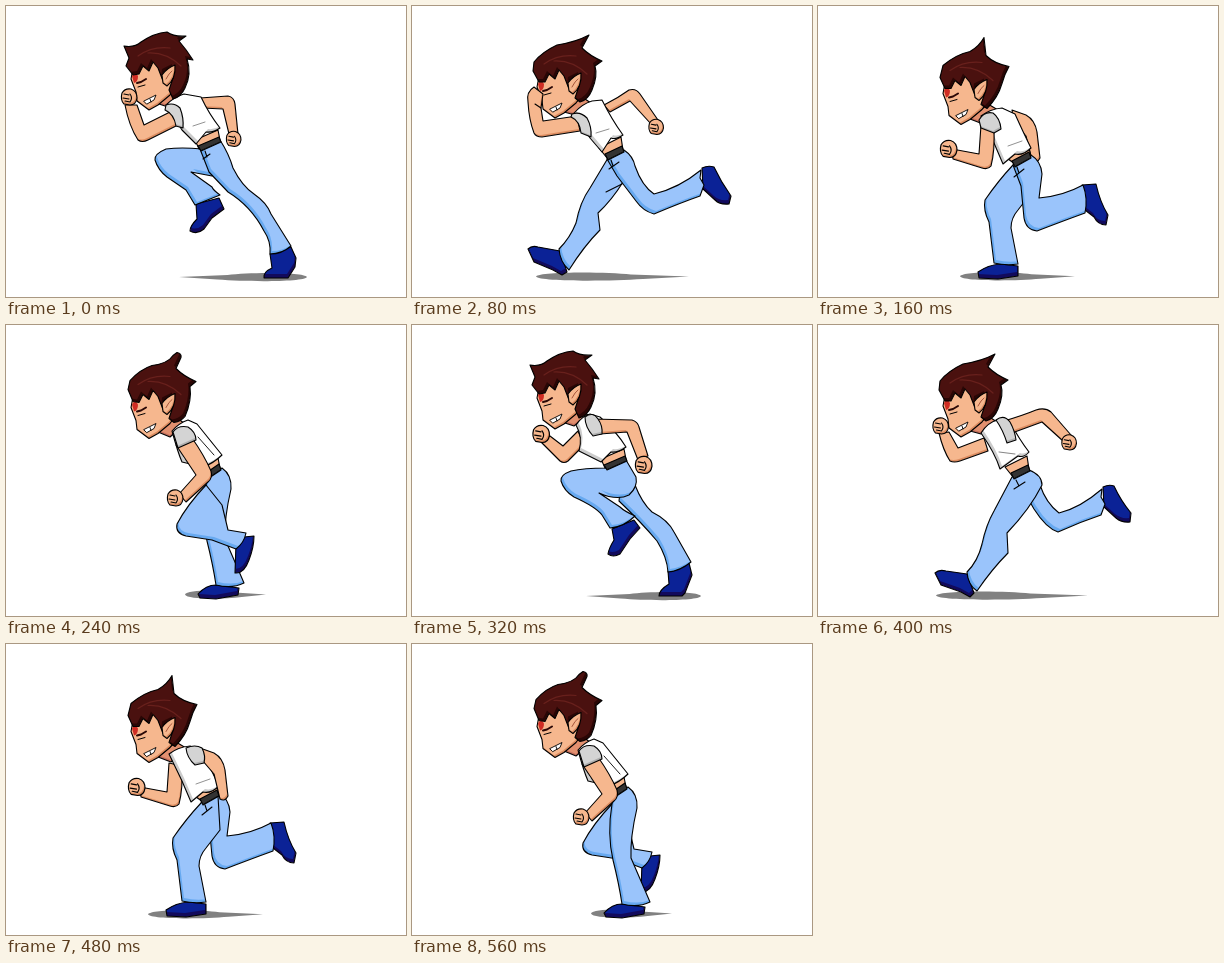
Write an HTML page with a canvas that moves like this. It is 400x291 px and loops after 0.64 s.

```html
<!DOCTYPE html>
<html lang="en">
<head>
<meta charset="utf-8">
<title>Run cycle</title>
<style>
  html, body { margin: 0; width: 100%; height: 100%; overflow: hidden; background: #fff; }
  canvas { display: block; width: 100vw; height: 100vh; }
</style>
</head>
<body>
<canvas id="stage"></canvas>
<script>
const W = 400, H = 291, STEP = 80;
const canvas = document.getElementById('stage');
const ctx = canvas.getContext('2d');
const ratio = window.devicePixelRatio || 1;
canvas.width = W * ratio;
canvas.height = H * ratio;

// Fills a path with its shade tone, then lays the lit tone over it, slightly shifted.
function solid(d, lit, shade, dx, dy) {
  const path = new Path2D(d);
  ctx.save();
  ctx.clip(path);
  ctx.fillStyle = shade;
  ctx.fill(path);
  ctx.translate(dx, dy);
  ctx.fillStyle = lit;
  ctx.fill(path);
  ctx.restore();
  line(path);
}

function line(d, color = '#000', width = 1.1) {
  ctx.strokeStyle = color;
  ctx.lineWidth = width;
  ctx.stroke(d instanceof Path2D ? d : new Path2D(d));
}

function flat(d, color) {
  ctx.fillStyle = color;
  ctx.fill(new Path2D(d));
}

const skin = d => solid(d, '#f6b78e', '#dc8c60', -1, -2);
const denim = d => solid(d, '#9ac4fb', '#67a9f0', 2, -3);
const cloth = d => solid(d, '#ffffff', '#cccccc', 2, -3);
const sleeve = d => solid(d, '#d4d4d4', '#aeaeae', -1, -2);
const shoe = d => solid(d, '#0b2296', '#120a5c', -1, -4);
const belt = d => solid(d, '#333333', '#111111', 0, -1);
const neck = d => solid(d, '#e2906f', '#c56f5c', 0, -2);

// A ground shadow, thick at one end and thin at the tip.
function shadow(fat, tip, y) {
  const at = t => fat + (tip - fat) * t;
  flat(`M${fat} ${y} C${at(0.02)} ${y - 5} ${at(0.45)} ${y - 5} ${at(0.62)} ${y - 2} L${tip} ${y}
    L${at(0.7)} ${y + 2.5} C${at(0.45)} ${y + 5} ${at(0.02)} ${y + 5} ${fat} ${y}Z`, '#818181');
}

function fist(x, y, r) {
  ctx.save();
  ctx.translate(x, y);
  ctx.scale(r / 8, r / 8);
  skin('M-7 -4 Q-4 -9 2 -8 Q8 -6 8 1 Q7 8 1 8 L-5 7 Q-9 3 -7 -4Z');
  line('M-5 -3 L0 -2 M-6 1 L0 2 M-4 4 L1 5 M1 -3 Q4 1 1 5');
  ctx.restore();
}

const hairTail = ' L163 84 L167 72 L168 61 L158 66 L157 75 L152 62 L147 56 L143 65 L137 60 L133 68 Z';
const hair = {
  sweep: 'M127 69 L120 60 L123 52 L118 40 Q128 42 135 36 Q148 27 161 26 Q168 31 180 30 L173 35 Q180 43 187 54 L181 53 Q186 68 179 82 Q175 91 167 93',
  spike: 'M127 68 L121 57 L122 48 Q130 38 145 31 Q164 28 177 21 L170 34 Q178 42 190 47 L183 52 Q186 62 180 76 Q176 86 168 88',
  lift: 'M127 68 L122 57 L125 45 Q138 34 152 31 Q161 26 166 17 L168 35 Q176 43 191 46 Q186 55 184 63 Q180 77 169 88',
  fall: 'M127 67 L122 55 L124 46 Q134 35 146 31 Q162 29 167 21 L171 18 Q176 19 175 23 L170 34 Q178 42 190 47 L184 52 Q186 66 179 82 Q175 87 168 88'
};

function head(dy, style) {
  ctx.save();
  ctx.translate(0, dy);
  skin('M127 62 L125 73 L130 86 L131 95 L143 104 L152 99 L164 89 L169 82 L170 68 L160 53 L140 55Z');
  flat('M126 70 Q129 64 132 70 Q132 76 128 77Z', '#cf2d24');
  line('M131 77 L135 76 L140 73', '#2a0806', 2);
  line('M132 81 L139 79', '#000', 1);
  flat('M138 95 L150 89 L148 94 L141 98Z', '#fff');
  line('M138 95 L150 89 L148 94 L141 98Z M144 93 L145 96', '#000', 0.9);
  solid(hair[style] + hairTail, '#4a110f', '#2a0605', -2, -3);
  line('M132 50 Q146 40 164 42 M142 47 Q160 46 175 60', '#68201c', 1.2);
  skin('M156 69 Q161 62 169 59 Q170 73 161 80 L157 77Z');
  line('M160 73 Q163 67 166 65', '#a6543a', 1);
  ctx.restore();
}

function waistHigh() {
  skin('M189 134 L212 124 L214 134 L193 143Z');
  belt('M192 140 L213 131 L215 136 L195 145Z');
  neck('M150 97 L168 84 L176 90 L162 101Z');
}

function waistLow() {
  skin('M187 142 L209 131 L211 144 L195 152Z');
  belt('M193 148 L210 140 L212 146 L196 154Z');
  neck('M152 106 L170 91 L179 97 L163 109Z');
}

// Push off, near arm forward.
function pushNear() {
  shadow(301, 173, 271);
  skin('M194 92 L222 90 Q228 91 229 98 L232 128 L223 128 L217 103 L196 102Z');
  fist(227.5, 133, 7.5);
  shoe('M190 198 L213 192 L218 203 L206 212 L198 223 Q191 229 184 225 Q184 220 191 213Z');
  denim('M196 143 Q175 141 160 143 Q148 148 149 154 Q152 164 161 171 L180 184 L189 199 L214 189 Q207 184 206 181 L185 166 L206 170 L216 160Z');
  shoe('M264 248 L285 241 L290 252 L289 261 L282 272 L258 272 Q257 266 266 262Z');
  denim('M194 143 L214 134 Q223 148 227 162 Q236 180 248 188 Q261 197 265 208 L285 240 Q276 248 264 248 Q265 235 258 225 Q245 200 222 186 L203 166Z');
  line('M199 145 L201 151 M197 153 L204 148');
  waistHigh();
  cloth('M160 99 Q168 91 178 88 L195 91 Q203 108 214 122 Q207 127 200 126 L190 138 L176 124Z');
  line('M187 120 L199 116', '#777', 0.8);
  head(0, 'sweep');
  skin('M166 105 L138 119 L131 99 L119 99 Q123 120 132 134 Q136 137 142 134 L172 119Z');
  fist(123, 91, 8);
  sleeve('M160 99 Q168 96 174 102 Q178 112 177 122 L170 120 Q168 108 159 104Z');
}

// Push off, far arm forward.
function pushFar() {
  shadow(289, 174, 271);
  skin('M166 106 L151 121 L138 111 L129 117 L148 136 Q152 139 156 136 L172 120Z');
  shoe('M256 246 L277 238 L280 250 L273 268 L270 271 L247 271 Q247 265 257 259Z');
  denim('M209 158 L223 160 Q230 178 240 187 Q256 195 262 207 L279 237 Q268 246 256 247 Q255 232 245 216 Q230 198 207 176Z');
  shoe('M200 204 L222 195 L228 203 L218 214 L208 229 Q201 233 196 229 Q197 223 202 215Z');
  denim('M194 143 Q172 143 159 146 Q148 150 149 156 Q152 166 162 172 Q184 182 190 190 L198 203 Q212 202 223 191 Q212 186 208 182 L187 168 Q205 176 217 170 Q226 162 224 152 L214 135Z');
  waistHigh();
  cloth('M164 100 Q170 91 178 89 L188 92 Q204 106 214 122 Q206 128 199 127 L189 137 L167 126 Q171 112 164 100Z');
  head(0, 'sweep');
  fist(129, 109, 8.5);
  skin('M181 94 L220 95 Q226 97 227 102 L236 131 L226 135 L215 107 L188 109Z');
  fist(231.5, 140, 8.5);
  sleeve('M173 92 Q181 86 186 94 Q191 101 190 109 L181 111 Q173 102 173 92Z');
}

// Long stride, near arm forward.
function strideNear() {
  shadow(124, 277, 270.5);
  skin('M192 99 Q206 92 217 84 Q224 82 228 88 L246 114 L239 118 L218 95 L198 106Z');
  fist(244, 121, 7.5);
  shoe('M116 243 Q120 239 126 241 L148 245 L155 266 L150 269 L141 264 L122 256Z');
  denim('M196 152 L211 176 Q200 194 186 207 L188 224 Q172 240 157 264 Q148 256 147 243 Q158 232 164 217 Q168 196 178 182Z');
  shoe('M290 162 Q296 159 302 161 Q309 176 319 190 L317 198 Q308 199 303 194 L291 183Z');
  denim('M195 153 L212 144 Q221 150 223 160 Q230 180 242 188 Q267 182 289 164 L288 172 L292 179 L288 190 Q268 197 242 208 Q231 205 224 195 L205 170Z');
  line('M199 154 L201 160 M197 163 L207 156 M194 186 L210 178');
  waistLow();
  cloth('M162 107 Q170 98 180 95 L190 94 Q200 114 211 129 Q204 134 199 132 L190 146 L178 132Z');
  line('M184 127 L197 123', '#777', 0.8);
  head(8, 'spike');
  skin('M165 110 L131 115 L129 102 L131 88 L122 81 Q114 86 116 96 Q117 114 122 127 Q124 131 130 131 L168 125Z');
  line('M129 102 L123 98');
  sleeve('M160 108 Q168 105 175 112 Q180 121 179 131 L169 127 Q168 115 159 111Z');
}

// Long stride, far arm forward.
function strideFar() {
  shadow(118, 270, 270.5);
  skin('M166 113 L140 123 L131 107 L121 108 Q125 125 132 136 Q136 138 142 136 L170 126Z');
  shoe('M285 162 Q291 159 296 161 Q303 176 313 188 L312 197 Q304 198 298 193 L286 182Z');
  denim('M205 165 L222 160 Q228 178 241 188 Q262 183 284 164 L283 172 L287 179 L283 190 Q262 197 240 207 Q228 203 216 184Z');
  shoe('M117 248 Q121 244 128 246 L149 249 L156 268 L152 272 L143 267 L123 260Z');
  denim('M194 152 L211 145 Q224 150 224 160 Q212 184 189 208 L190 228 Q174 244 159 266 Q150 260 149 247 Q160 236 164 219 Q168 200 176 186Z');
  line('M198 155 L201 161 M196 164 L207 157');
  waistLow();
  cloth('M163 108 Q170 97 180 95 L192 97 Q201 114 211 127 Q206 133 200 131 L182 144 Q177 128 163 108Z');
  line('M181 127 L197 129', '#666', 0.8);
  head(8, 'spike');
  fist(122.5, 101, 8);
  skin('M186 96 Q206 90 218 85 Q227 82 233 87 L253 110 L245 116 L224 97 L194 108Z');
  fist(251, 117.5, 7.5);
  sleeve('M178 95 Q186 89 192 97 Q197 106 198 115 L189 118 Q185 105 178 95Z');
}

// Weight lands on the front foot; either arm may be the forward one.
function land(nearForward) {
  const front = () => {
    skin('M163 119 L176 122 Q177 145 173 160 Q170 164 164 162 L135 153 L134 143 L161 148Z');
    fist(130.5, 143, 8.5);
  };
  const back = () => skin('M194 104 L208 109 Q217 114 219 126 L222 152 Q219 158 214 155 L208 130 L196 116Z');
  const foreLeg = () => {
    shoe('M160 266 Q170 259 182 258 L200 260 L200 270 L180 273 L161 272Z');
    denim('M195 159 Q180 175 167 194 Q165 204 171 216 L176 257 Q188 260 200 258 L193 222 Q193 212 200 204 L214 186 L212 152Z');
  };
  const rearLeg = () => {
    shoe('M264 179 L278 178 Q282 196 290 209 L288 219 Q280 219 276 211 L267 204Z');
    denim('M195 159 L213 149 Q223 155 224 168 L221 192 Q245 190 265 179 Q270 192 267 207 Q245 215 219 225 Q208 224 206 212 L203 180Z');
  };
  shadow(142, 257, 270.3);
  (nearForward ? back : front)();
  for (const leg of nearForward ? [foreLeg, rearLeg] : [rearLeg, foreLeg]) leg();
  line('M199 161 L201 167 M196 171 L206 163');
  skin('M186 150 L210 138 L213 150 L197 158Z');
  belt('M194 155 L211 146 L213 152 L197 161Z');
  neck('M152 113 L170 98 L180 104 L165 118Z');
  cloth('M163 110 Q172 103 184 102 L197 108 Q206 128 213 142 Q205 150 197 148 L185 158 L176 137Z');
  line('M190 140 L204 135', '#777', 0.8);
  head(14.5, 'lift');
  if (nearForward) {
    front();
    sleeve('M161 114 Q166 105 175 107 Q182 112 183 123 L176 127 L163 122Z');
  } else {
    back();
    sleeve('M180 104 Q189 100 196 104 Q200 112 198 119 L189 121 Q181 114 180 104Z');
  }
}

// Legs pass each other under the body.
function pass(nearSupport) {
  const support = () => {
    shoe('M192 269 Q200 260 210 260 L233 263 L232 270 L210 274 L194 273Z');
    denim('M202 152 L216 143 Q226 150 225 164 Q218 194 219 214 L238 258 Q226 264 210 260 Q207 240 201 216 Q195 190 200 160Z');
  };
  const swing = () => {
    shoe('M230 218 L238 212 L248 211 Q248 222 243 235 Q238 249 229 248Z');
    denim('M200 160 Q181 180 171 199 Q169 208 180 211 L206 215 L230 224 Q238 218 240 208 L222 205 L216 180Z');
  };
  shadow(179, 260, 269.5);
  skin('M198 110 Q208 118 212 130 L203 131Z');
  for (const leg of nearSupport ? [swing, support] : [support, swing]) leg();
  skin('M196 143 L212 133 L214 143 L202 151Z');
  belt('M200 148 L213 139 L215 145 L203 153Z');
  neck('M152 107 L170 92 L179 99 L164 112Z');
  cloth('M166 106 Q173 98 182 95 L191 99 Q203 114 216 130 Q208 138 197 142 L176 137 Q172 128 166 106Z');
  line('M192 112 L208 130', '#000', 0.9);
  head(9.5, 'fall');
  skin('M170 120 L186 113 Q198 130 205 146 Q207 153 202 157 L180 177 L173 169 L190 150Z');
  fist(169, 173, 8);
  sleeve('M167 107 Q172 100 182 102 Q190 107 190 115 L172 123Z');
}

const cycle = [
  pushNear, strideNear, () => land(true), () => pass(false),
  pushFar, strideFar, () => land(false), () => pass(true)
];

const start = performance.now();
function draw(now) {
  const step = Math.floor(Math.max(0, now - start) / STEP) % cycle.length;
  ctx.setTransform(ratio, 0, 0, ratio, 0, 0);
  ctx.fillStyle = '#fff';
  ctx.fillRect(0, 0, W, H);
  ctx.lineJoin = ctx.lineCap = 'round';
  cycle[step]();
  requestAnimationFrame(draw);
}
draw(start);
</script>
</body>
</html>
```
